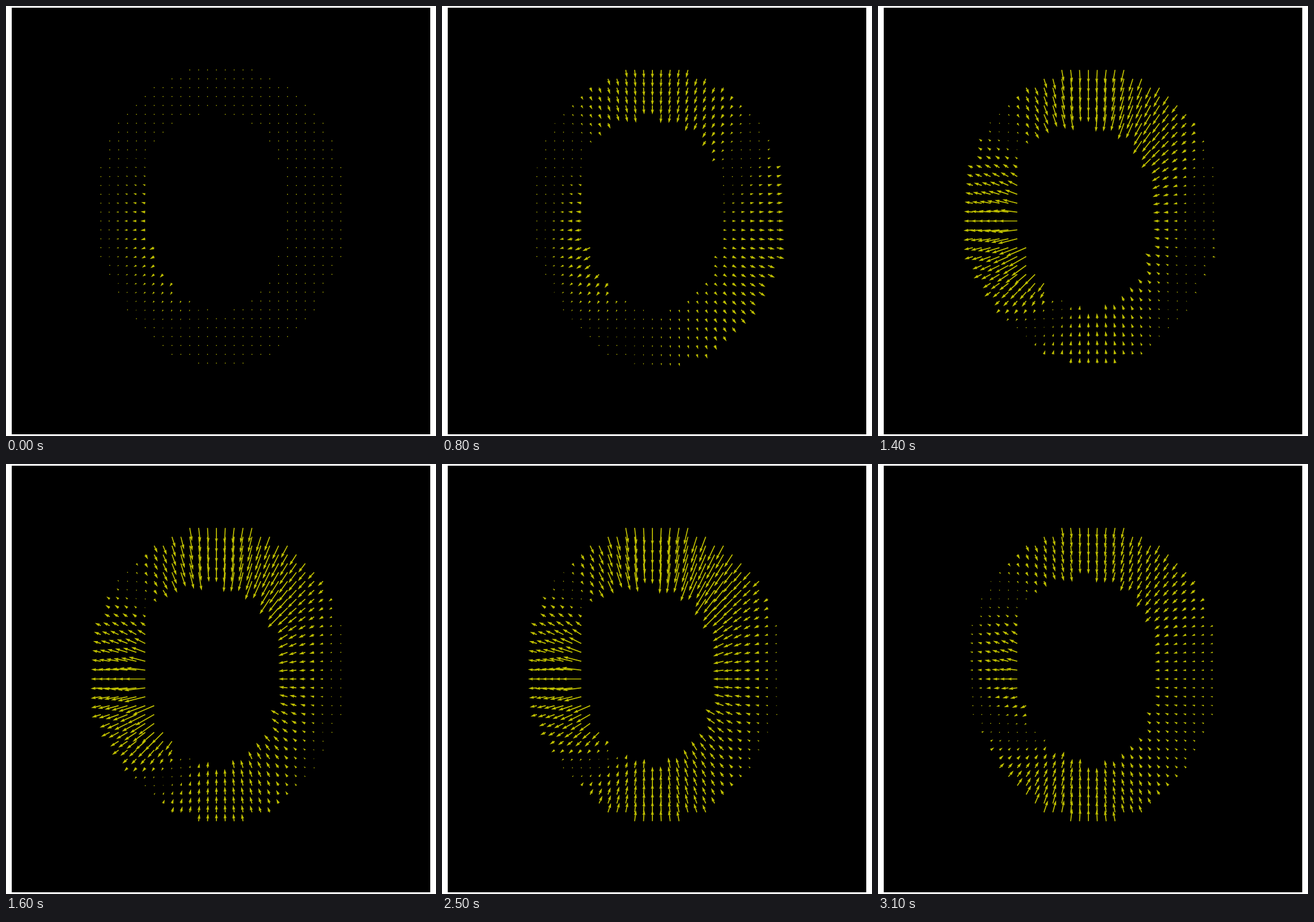
These frames come from a looping animation (748x748 px, 3200 ms). An HTML page with a canvas:

```html
<!DOCTYPE html>
<html lang="en">
<head>
<meta charset="utf-8">
<title>Radial vector field</title>
<style>
  html, body { margin: 0; width: 100%; height: 100%; overflow: hidden; background: #fff; }
  canvas { display: block; width: 748px; height: 748px; }
</style>
</head>
<body>
<canvas id="stage" width="748" height="748"></canvas>
<script>
const ctx = document.getElementById('stage').getContext('2d');
const LOOP = 3200, STEP = 100;
const CX = 366, CY = 374, GAP = 15.46;
const SHAFT = 1.745;
const HEAD = 5 * SHAFT, NOTCH = 4.5 * SHAFT, HEAD_HALF = 1.5 * SHAFT;
const ALL_ROUND = 1e4;

// Each phase swells and fades over the steps of the loop. Its lobes pull inward
// (positive) or push outward, with one strength at the hole and one at the rim.
// Angles are in degrees, clockwise from the top.
const lobe = (angle, width, inner, outer) => ({ angle, width, inner, outer });
const PHASES = [
  { name: 'start', peak: 0, rise: 1, fall: 3, lobes: [
    lobe(250, 55, -9, -1)] },
  { name: 'early', peak: 5, rise: 3.5, fall: 4, lobes: [
    lobe(268, 45, 5, 12), lobe(0, 35, 4, 8)] },
  { name: 'swing', peak: 7, rise: 4.5, fall: 7, lobes: [
    lobe(123, 75, -13, -14)] },
  { name: 'bulge', peak: 14, rise: 7, fall: 5, lobes: [
    lobe(238, 35, -11, -4)] },
  { name: 'squeeze', peak: 23, rise: 14.7, fall: 9.5, lobes: [
    lobe(0, ALL_ROUND, 20, 0), lobe(10, 42, 19, 29),
    lobe(185, 42, -2, 17), lobe(262, 56, -56, -15)] },
  { name: 'late', peak: 32, rise: 6.5, fall: 1, lobes: [
    lobe(213, 50, 14, 11), lobe(0, ALL_ROUND, -3, 4)] }
];

const bump = (distance, width) => Math.exp(-Math.pow(Math.abs(distance) / width, 3));

const swell = (phase, step) => {
  const d = step - phase.peak;
  return bump(d, d < 0 ? phase.rise : phase.fall);
};

// Size of a point relative to an oval: 1 on its edge
const level = (x, y, power) =>
  Math.pow(Math.pow(Math.abs(x), power) + Math.pow(Math.abs(y), power), 1 / power);
const rimLevel = (i, j) =>
  level((i - .5) / (14.2 * (1 - .003 * j)), (j + .6) / 17.1, 2);
const holeLevel = (i, j) =>
  level((i - .04 * j) / (7.65 * (1 - .012 * j)), (j + 1) / 11.05, 2.2);

function buildPoints() {
  const list = [];
  for (let j = -18; j <= 18; j++) {
    for (let i = -15; i <= 15; i++) {
      const rim = rimLevel(i, j), hole = holeLevel(i, j);
      if (rim > 1 || hole < 1) continue;
      const toHole = 1 - 1 / hole, toRim = 1 / rim - 1;
      const depth = toHole / (toHole + toRim);
      const degrees = Math.atan2(i, -j) * 180 / Math.PI;
      const pulls = PHASES.map(({ lobes }) => lobes.reduce((sum, l) => {
        const turn = (degrees - l.angle + 900) % 360 - 180;
        return sum + bump(turn, l.width) * (l.inner + (l.outer - l.inner) * depth);
      }, 0));
      list.push({ x: CX + i * GAP, y: CY + j * GAP, inward: Math.atan2(-j, -i), pulls });
    }
  }
  return list;
}

function trace(x, y, angle, corners) {
  const c = Math.cos(angle), s = Math.sin(angle);
  corners.forEach(([a, b], n) => {
    ctx[n ? 'lineTo' : 'moveTo'](x + a * c - b * s, y + a * s + b * c);
  });
  ctx.closePath();
}

const DOT = Array.from({ length: 6 }, (_, n) =>
  [Math.cos(n * Math.PI / 3) * SHAFT / 2, Math.sin(n * Math.PI / 3) * SHAFT / 2]);

// Arrows shorter than a head shrink as a whole; the shortest become dots
function arrow(x, y, angle, length) {
  if (length < SHAFT) return trace(x, y, 0, DOT);
  const k = Math.min(1, length / HEAD);
  const half = SHAFT / 2 * k, wing = HEAD_HALF * k;
  const neck = length - NOTCH * k, back = length - HEAD * k;
  trace(x, y, angle, [
    [0, half], [neck, half], [back, wing], [length, 0],
    [back, -wing], [neck, -half], [0, -half]
  ]);
}

const points = buildPoints();

function draw(step) {
  const weights = PHASES.map(phase => swell(phase, step));
  ctx.fillStyle = '#fff';
  ctx.fillRect(0, 0, 748, 748);
  ctx.fillStyle = '#000';
  ctx.fillRect(10, 3, 728, 742);
  ctx.fillStyle = '#bfbf00';
  ctx.beginPath();
  for (const p of points) {
    const pull = p.pulls.reduce((sum, v, n) => sum + v * weights[n], 0);
    arrow(p.x, p.y, p.inward + (pull < 0 ? Math.PI : 0), Math.abs(pull));
  }
  ctx.fill();
}

const start = performance.now();
function tick() {
  draw(Math.floor((performance.now() - start) % LOOP / STEP));
  requestAnimationFrame(tick);
}
tick();
</script>
</body>
</html>
```
